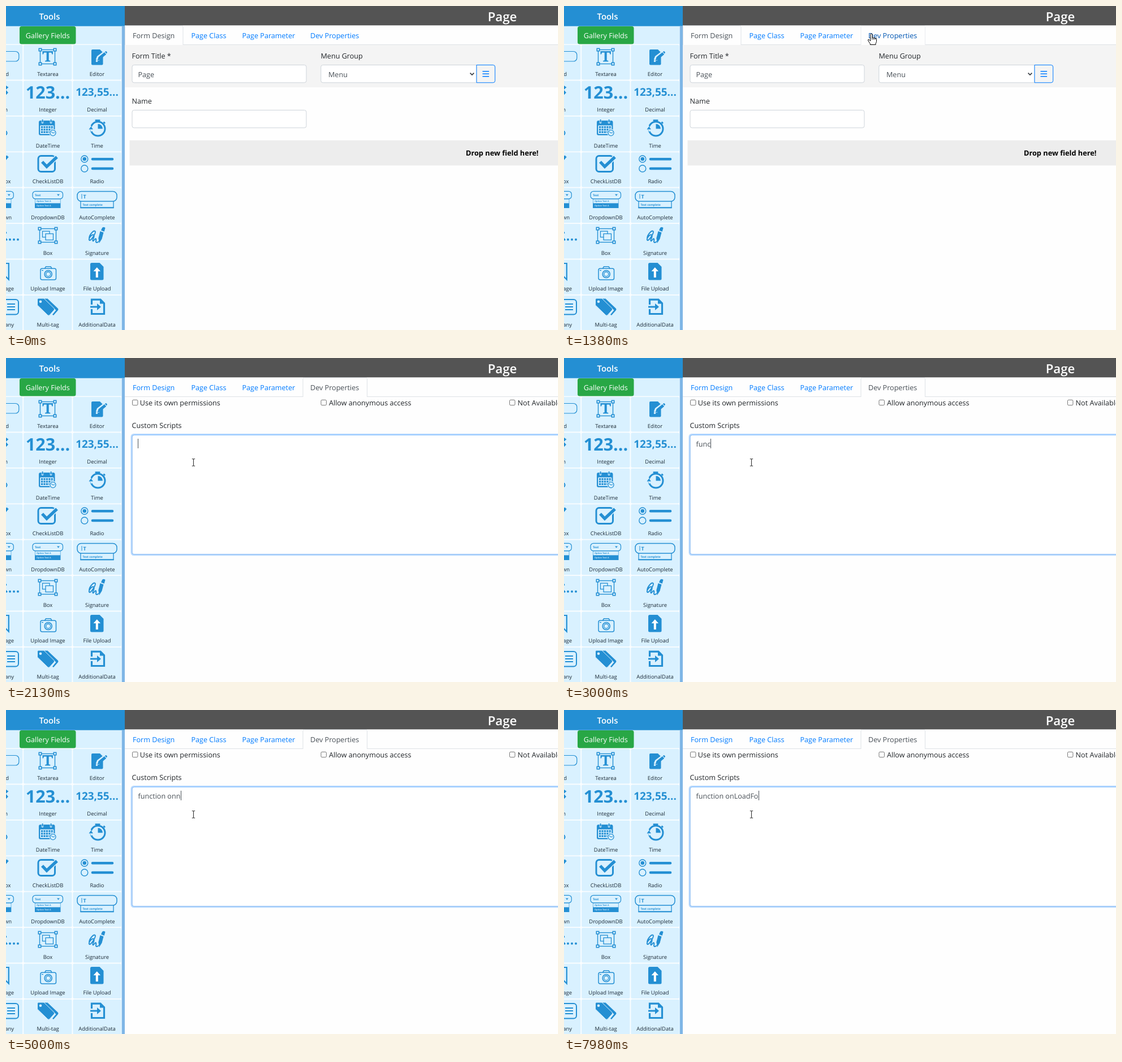
Animation of 976x574 px, one loop 8000 ms. Source, as an HTML page:

```html
<!DOCTYPE html>
<html lang="en">
<head>
<meta charset="utf-8">
<title>Form designer</title>
<style>
html, body { margin: 0; width: 100%; height: 100%; overflow: hidden; background: #fff; }
svg { display: block; width: 976px; height: 574px; }
text { font: 12.6px "Open Sans", "Noto Sans", sans-serif; fill: #212529; white-space: pre; text-rendering: geometricPrecision; }
.mid { text-anchor: middle; }
#side .lab { font-size: 9.45px; fill: #1c2b36; }
#side .num { font-weight: 700; fill: #248fd3; }
#side .tiny { font-weight: 700; font-size: 5px; fill: #248fd3; }
.val { fill: #495057; }
.box { fill: #fff; stroke: #ced4da; }
.check { fill: #fff; stroke: #767676; }
.fill { fill: #248fd3; }
.line { fill: none; stroke: #248fd3; }
.pale { fill: #d9f1ff; }
.cut { fill: none; stroke: #d9f1ff; }
</style>
</head>
<body>
<svg viewBox="0 0 976 574">
  <rect width="976" height="574" fill="#fefefe"/>

  <g id="form">
    <rect x="210" y="69" width="766" height="75" fill="#f4f4f4"/>
    <text x="222.5" y="92.5">Form Title *</text>
    <text x="556.5" y="92.5">Menu Group</text>
    <rect class="box" x="223" y="104.5" width="308" height="31.3" rx="3.5"/>
    <text class="val" x="233.5" y="126">Page</text>
    <path class="box" d="M832 104.5H560.3a3.5 3.5 0 0 0-3.5 3.5v24.3a3.5 3.5 0 0 0 3.5 3.5H832z"/>
    <text class="val" x="570" y="126">Menu</text>
    <path d="M820.6 118.6l3.4 3.4 3.4-3.4" fill="none" stroke="#343a40" stroke-width="1.6"/>
    <path d="M832 104.5h29.2a3.5 3.5 0 0 1 3.5 3.5v24.3a3.5 3.5 0 0 1-3.5 3.5H832z" fill="#f4f4f4" stroke="#007bff"/>
    <path d="M842.5 115.7h11.6m-11.6 4.5h11.6m-11.6 4.5h11.6" stroke="#007bff" stroke-width="1.6"/>
    <text x="222.5" y="172.5">Name</text>
    <rect class="box" x="223" y="184.5" width="308" height="31.3" rx="3.5"/>
    <rect x="218.5" y="238" width="757.5" height="44.5" fill="#ededed"/>
    <text x="813" y="265" style="font-weight:700;font-size:12.75px;fill:#000">Drop new field here!</text>
  </g>

  <g id="dev">
    <rect class="check" x="223.5" y="74.3" width="9.4" height="9.4" rx="1.8"/>
    <text x="236.8" y="84">Use its own permissions</text>
    <rect class="check" x="557" y="74.3" width="9.4" height="9.4" rx="1.8"/>
    <text x="571" y="84">Allow anonymous access</text>
    <rect class="check" x="890.5" y="74.3" width="9.4" height="9.4" rx="1.8"/>
    <text x="904.6" y="84">Not Available</text>
    <text x="222.5" y="124">Custom Scripts</text>
    <rect id="glow" x="222" y="135.4" width="780" height="213.4" rx="4" fill="none" stroke="#b9daff" stroke-width="3"/>
    <rect class="box" x="223" y="136.5" width="780" height="211.3" rx="3.5"/>
    <rect id="focus" x="223" y="136.5" width="780" height="211.3" rx="3.5" fill="none" stroke="#80bdff"/>
    <text id="code" class="val" x="233.6" y="157" style="font-size:12.55px"></text>
    <rect id="caret" y="143" width="1" height="17" fill="#495057"/>
  </g>

  <rect x="210" y="34" width="766" height="34" fill="#fefefe"/>
  <path d="M210 68.5H976" stroke="#dee2e6"/>
  <g id="tabs"></g>

  <rect x="210" width="766" height="34.3" fill="#545454"/>
  <text class="mid" x="877.5" y="26.6" style="font-weight:600;font-size:22.2px;fill:#fff">Page</text>

  <g id="side"></g>
  <rect x="204" y="36" width="6" height="538" fill="#d0e8fb"/>
  <rect x="205" y="36" width="5" height="538" fill="#7fb6e6"/>
  <rect width="210" height="35.7" fill="#248fd3"/>
  <text class="mid" x="77" y="24" style="font-weight:600;font-size:14.9px;fill:#fff">Tools</text>
  <rect x="24" y="36" width="99.5" height="31.6" rx="3.5" fill="#28a745"/>
  <text class="mid" x="73.8" y="56.7" style="fill:#fff">Gallery Fields</text>

  <g id="arrow"><path d="M.5.5v15.6l3.6-3.4 2.5 5.7 2.6-1.1-2.5-5.6h5z" fill="#fff" stroke="#000"/></g>
  <g id="hand">
    <path d="M-1.6 1.2q1.6-2.4 3.2 0V7q1.5-1 2.6.5 1.6-.8 2.5.6 1.8-.5 2.3 1.2v4.2q0 2-1.4 3.7v2.3H-2.2v-1.9q-2-2.4-3.6-5.6-.5-2 1.4-1.6l2.8 2.6z" fill="#fff" stroke="#000"/>
    <path d="M1.6 6.5v4m2.6-3v3m2.5-2.5v2.6" stroke="#000" fill="none"/>
  </g>
  <g id="ibeam"><path d="M-2.7-6.3h2l.7.8.7-.8h2M-2.7 6.3h2l.7-.8.7.8h2M0-5.5v11" fill="none" stroke="#333" stroke-width="1.1"/></g>
</svg>

<script>
const el = id => document.getElementById(id);
const show = (node, on) => node.setAttribute("display", on ? "inline" : "none");

// ---- sidebar ----
const PITCH = 63.4;
const labels = [
  ["Textarea", "Editor"], ["Integer", "Decimal"], ["DateTime", "Time"], ["CheckListDB", "Radio"],
  ["DropdownDB", "AutoComplete"], ["Box", "Signature"], ["Upload Image", "File Upload"], ["Multi-tag", "AdditionalData"]
];
const edge = [["d", 5], ["n", 3], null, ["ox", 8.5], ["wn", 10], null, ["age", 14], ["any", 14]];

const fill = (d, extra = "") => `<path class="fill" d="${d}" ${extra}/>`;
const line = (d, w = 1.5, cls = "line") => `<path class="${cls}" d="${d}" stroke-width="${w}"/>`;
const rect = (x, y, w, h, cls, r = 0, sw = 1.3) =>
  `<rect x="${x}" y="${y}" width="${w}" height="${h}" rx="${r}" class="${cls}" stroke-width="${sw}"/>`;
const disc = (x, y, r, cls = "fill", sw = 1.5) => `<circle cx="${x}" cy="${y}" r="${r}" class="${cls}" stroke-width="${sw}"/>`;
const word = (s, x, y, cls, style = "") => `<text class="${cls}" x="${x}" y="${y}" style="${style}">${s}</text>`;

function frame(x, y, w, h) {
  let s = rect(x, y, w, h, "line", 0, 1.4);
  for (const cx of [x, x + w]) for (const cy of [y, y + h])
    s += rect(cx - 2.5, cy - 2.5, 5, 5, "pale") + rect(cx - 2.2, cy - 2.2, 4.4, 4.4, "line", 0, 1.6);
  return s;
}

function dropdown(x) {
  return rect(x, 328.3, 53.5, 13.4, "line", 5, 1.2) + word("Text", x + 4, 336.8, "tiny") +
    fill(`M${x + 43} 333.5h5l-2.5 3z`) +
    rect(x + 4, 342, 45.5, 16, "fill") + rect(x + 4.6, 342.4, 44.3, 7, "pale") +
    word("Option Text A", x + 7, 347.4, "tiny", "font-size:3.8px") +
    word("Option Text A", x + 7, 354.6, "tiny", "font-size:3.8px;fill:#bfe2f8");
}

function calendar() {
  let s = rect(58, 203, 28.5, 26, "fill", 3) + rect(60.3, 211.5, 24, 15.2, "pale", 1);
  for (const x of [64.5, 79.5]) s += rect(x - 1.8, 201, 3.6, 7, "pale", 1.5) + rect(x - 1, 201, 2.2, 5.5, "fill", 1);
  for (let r = 0; r < 3; r++) for (let c = 0; c < 5; c++) s += rect(62 + c * 4.4, 213 + r * 4.4, 3.2, 3.2, "fill");
  return s + disc(83, 224.8, 6.8, "pale") + disc(83, 224.8, 5, "line", 1.3) + line("M80.2 223.2l3 1.8 2.8-.6", 1.1);
}

const icons = [
  frame(60.5, 77.5, 26, 25) + fill("M64.5 80h18.4v5.6h-1.6l-1-3h-4.6v13.6l2.6.8v1.5h-9.2V97l2.6-.8V82.6h-4.6l-1 3h-1.6z"),
  fill("M153 77h13l5.5 5.5v20a2 2 0 0 1-2 2H153a2 2 0 0 1-2-2V79a2 2 0 0 1 2-2z") +
    line("M161.5 96l2-5 12-9", 6, "cut") +
    fill("M161.5 97l2-6.5 10.5-8.5 3.2 3.8-10.5 8.7zM174.8 81.3l1.7-1.4q2.6.5 2.3 3l-1.2 1.5z") + disc(160.5, 97.5, 1.8, "pale"),
  word("123...", 74, 164, "num mid", "font-size:30.5px"),
  word("123,55...", 161, 159, "num mid", "font-size:18.9px"),
  calendar(),
  disc(162.5, 217.5, 12.5, "line", 3) + rect(157.5, 201.3, 9, 2.8, "fill", 1) + rect(160.7, 203, 2.7, 3, "fill") +
    line("M172.5 205.5l2.5 2.5", 2.6) + fill("M162.5 217.5V209a8.5 8.5 0 0 1 8.5 8.5z") +
    line("M148 212l3 7 4-6", 4, "cut") + fill("M146.5 218.5h7.5l-3.8-5z"),
  rect(57, 265.5, 29.5, 28, "line", 5, 3) + line("M64 276l8 8.5 18-17", 8, "cut") + line("M64 276l8 8.5 18-17", 5.4),
  disc(138.8, 271, 6, "line", 1.4) + disc(138.8, 271, 3.3) + disc(138.8, 288, 6, "line", 1.4) +
    `<path class="line" d="M153 271.3h35m-35 16.7h35" stroke-width="4.6" stroke-linecap="round"/>`,
  dropdown(47),
  rect(132, 345, 58, 12.5, "line", 0, 1.3) + rect(126, 328.5, 70, 17.6, "pale", 7) + rect(126, 328.5, 70, 17.6, "line", 7, 1.5) +
    line("M131.5 357.2h59", 2) + line("M134 333v8.5", 1) + word("T", 136.5, 341, "tiny", "font-size:9px") + word("Text complete", 135.5, 353.6, "tiny"),
  frame(59.5, 394.5, 29, 24) + rect(64.5, 399, 12.5, 10.5, "line") + rect(70, 403.5, 13.5, 11, "pale") + rect(70, 403.5, 13.5, 11, "line"),
  line("M147 411c1-7 8-14 10.500-12 2.500 2.500-8 18-10 16-2.500-3 4-11 7.500-9.500 3 2-3 9-1.500 10.500s4-5 5.500-3.500-1.500 6 1 6.500 2.500-2 4-1.500".replaceAll("500", "5"), 2) +
    fill("M166.5 399l6 2.2-3 11.5-4.8 7.5-1.300-9z".replace(".300", ".3")) + fill("M168 397.5l2-4.5q2.5-2.5 5.5 0l-1.8 6.7z"),
  rect(61, 465, 27.5, 20, "line", 3, 1.5) + line("M68.5 465l2-3.3H79l2 3.3", 1.5) + disc(74.7, 475, 6.5, "line", 1.6) +
    disc(74.7, 475, 4, "line", 1.3) + rect(63, 467.8, 3, 1.3, "fill"),
  fill("M151.5 455h14l7 7v21a2.5 2.5 0 0 1-2.5 2.5h-18.5a2.5 2.5 0 0 1-2.5-2.5v-25.500a2.5 2.5 0 0 1 2.5-2.5z") +
    fill("M160.8 463l6.2 7h-4.2v11h-4v-11h-4.2z", `style="fill:#fff"`),
  fill("M64 518.5h9.5L92 536q1 1.5 0 3l-8 9-2-1.2 6.5-8z") +
    fill("M57.5 518H67l18 17.5q1.5 1.5 0 3.2l-8 9q-1.6 1.2-3.2 0L55.5 530v-10q0-2 2-2z", `stroke="#d9f1ff"`) + disc(61, 523.7, 2.3, "pale"),
  line("M151.5 529v-8.8H167l6.5 6.5v18.8h-22V537", 3.2) + line("M149 533h14", 3) + fill("M161 527l7 6-7 6z") + fill("M166 519v8.5h8z")
];

const edgeIcons =
  rect(-40, 80.5, 62.8, 17.5, "line", 6, 1.2) +
  fill("M0 141l4.5 3-4.5 4zM0 149l4 4.5-4 4z") +
  disc(-2, 225, 3.6, "line", 2) +
  line("M-3 273l6-7", 4.5) +
  dropdown(-40.2) +
  line("M-3 403l4-2m-4 9l5 5", 3) + [7, 14, 21].map(x => disc(x, 413.8, 2)).join("") +
  line("M-4 456h8.8v28.5l-6-6", 2.2) +
  rect(-20, 520, 42, 26.5, "line", 5, 2) + line("M2 528h14m-14 5h14m-14 5h14", 1.8);

let side = `<rect x="0" y="36" width="204" height="538" fill="#fafdff"/>` + rect(0, 35, 204, 32.5, "pale");
labels.forEach((row, r) => {
  const y = 69 + r * PITCH;
  for (let c = 0; c < 3; c++) side += rect(-56 + c * 87.2, y, 85.3, 61.6, "pale", 2);
  row.forEach((s, c) => side += word(s, 74 + c * 87, 124 + r * PITCH, "lab mid"));
  if (edge[r]) side += word(edge[r][0], edge[r][1], 124 + r * PITCH, "lab", "text-anchor:end");
});
el("side").innerHTML = side + icons.join("") + edgeIcons;

// ---- tabs ----
const tabs = [["Form Design", 224, 210, 313], ["Page Class", 327.5, 314, 403], ["Page Parameter", 417.5, 404, 523], ["Dev Properties", 538, 524.5, 638.5]];
el("tabs").innerHTML = tabs.map(([s, x, a, b]) =>
  `<g><path d="M${a + .5} 69V37q0-2.5 2.5-2.5H${b - 2.5}q2.5 0 2.5 2.5V69" fill="#fefefe"/>${word(s, x, 56.7, "")}</g>`).join("");
const tabNodes = [...el("tabs").children];

function drawTabs(active, hover) {
  tabNodes.forEach((g, i) => {
    const [border, label] = g.children;
    show(border, i === active || i === hover);
    border.setAttribute("stroke", i === active ? "#dee2e6" : "#e9ecef");
    label.style.fill = i === active ? "#495057" : i === hover ? "#0056b3" : "#007bff";
  });
}

// ---- pointer: time, x, y ----
const path = [
  [70, 922, 556], [140, 800, 474], [210, 660, 383], [280, 540, 312], [350, 499, 287], [560, 499, 287],
  [610, 488, 266], [750, 418, 148], [820, 352, 73], [890, 319, 14], [960, 323, 2], [1100, 412, 13],
  [1240, 508, 32], [1310, 538, 45], [1380, 543.5, 49], [1520, 543.5, 49], [1590, 528, 76], [1800, 392, 152], [1940, 331.5, 185]
];
const inside = (x, y, a, b, c, d) => x >= a && x <= c && y >= b && y <= d;

function pointerAt(time) {
  const base = time < 610 ? 0 : 610;
  const t = base + Math.floor((time - base) / 70) * 70;
  const i = path.findIndex(p => p[0] > t);
  if (i === 0) return null;
  if (i < 0) return path[path.length - 1].slice(1);
  const [t0, x0, y0] = path[i - 1], [t1, x1, y1] = path[i];
  const k = (t - t0) / (t1 - t0);
  return [x0 + (x1 - x0) * k, y0 + (y1 - y0) * k];
}

// ---- typing: time, text, caret x (0 = hidden) ----
const FN = "function ";
const typing = [
  [0, "", 0], [2000, "", 233], [2530, "", 0],
  [2790, "f", 237], [2860, "fu", 245], [2930, "fun", 253], [3000, "func", 259],
  [3200, "functi", 267], [3270, "functio", 274], [3800, "functio", 0], [3870, "function", 282],
  [4070, FN, 285], [4600, FN, 0], [4860, FN + "o", 293], [4930, FN + "on", 301], [5000, FN + "onn", 309],
  [5530, FN + "onn", 0], [5790, FN + "on", 0], [5990, FN + "o", 294], [6390, FN + "on", 301], [6520, FN + "onL", 307],
  [6720, FN + "onLo", 315], [6790, FN + "onLoa", 322], [6860, FN + "onLoad", 329], [7390, FN + "onLoad", 0],
  [7850, FN + "onLoadF", 336], [7980, FN + "onLoadFo", 344]
];

const LOOP = 8000, SWITCH = 1510, FOCUS = 2000;

function draw(t) {
  const dev = t >= SWITCH;
  show(el("form"), !dev);
  show(el("dev"), dev);

  const p = pointerAt(t);
  let kind = "", hover = -1;
  if (p) {
    const [x, y] = p;
    hover = tabs.findIndex(tab => inside(x, y, tab[2], 35, tab[3], 68));
    const field = dev ? inside(x, y, 223, 136, 976, 348)
      : inside(x, y, 223, 104, 531, 136) || inside(x, y, 223, 184, 531, 216);
    kind = hover >= 0 ? "hand" : field ? "ibeam" : "arrow";
    el(kind).setAttribute("transform", `translate(${x} ${y})`);
  }
  for (const id of ["arrow", "hand", "ibeam"]) show(el(id), id === kind);
  drawTabs(dev ? 3 : 0, hover);

  const glow = Math.max(0, Math.min(1, (t - FOCUS) / 130));
  el("glow").setAttribute("opacity", glow);
  el("focus").setAttribute("opacity", glow);

  const [, text, caret] = typing.filter(s => s[0] <= t).pop();
  el("code").textContent = text;
  show(el("caret"), caret > 0);
  el("caret").setAttribute("x", caret);
}

const start = performance.now();
function tick() {
  draw((performance.now() - start) % LOOP);
  requestAnimationFrame(tick);
}
tick();
</script>
</body>
</html>
```
